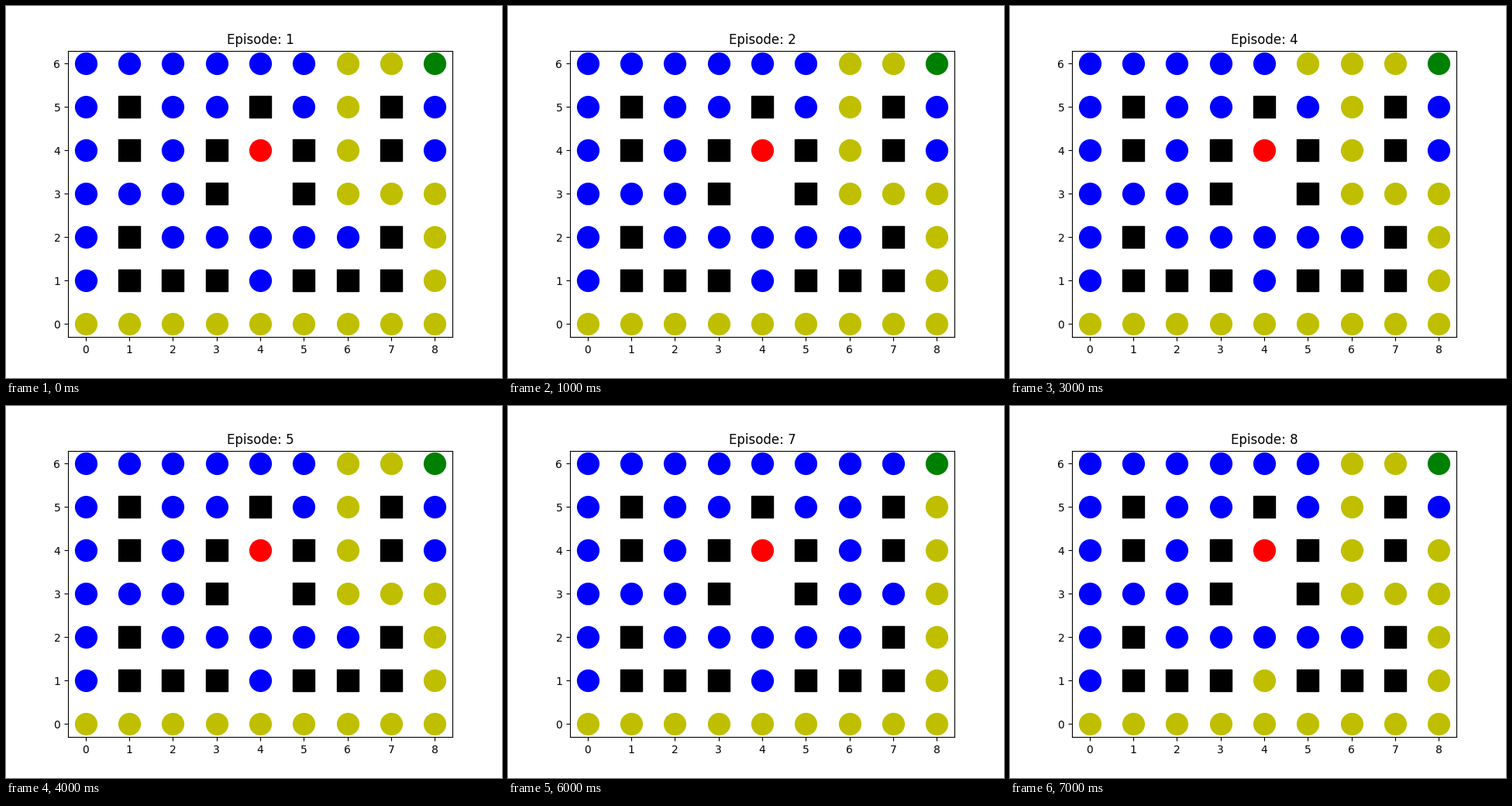
A matplotlib script that plays this animation: 640x480 px, repeating every 8000 ms.

```python
import matplotlib.pyplot as plt
from matplotlib.animation import FuncAnimation

# Maze from the top row down: '#' wall, 'S' start mark, 'G' goal, ' ' left empty
MAZE = [
    "........G",
    ".#..#..#.",
    ".#.#S#.#.",
    "...# #...",
    ".#.....#.",
    ".###.###.",
    ".........",
]
ROWS, COLS = len(MAZE), len(MAZE[0])


def cells(kind):
    return [(x, ROWS - 1 - r) for r, row in enumerate(MAZE)
            for x, c in enumerate(row) if c == kind]


# Visited cells: a shared route, with the side steps some episodes take
BOTTOM = {(x, 0) for x in range(COLS)}
RIGHT = {(8, y) for y in range(1, 6)}
DETOUR = (BOTTOM | {(8, y) for y in range(1, 4)}
          | {(6, y) for y in range(3, 7)} | {(7, 3), (7, 6)})
EXTRA = {4: {(5, 6)}, 6: {(8, 4), (8, 5), (6, 2)}, 8: {(8, 4), (4, 1)}}
EPISODES = 8


def route(episode):
    if episode == 7:
        return BOTTOM | RIGHT
    return DETOUR | EXTRA.get(episode, set())


fig, ax = plt.subplots(figsize=(6.4, 4.8), dpi=100)
ax.set_xlim(-0.4, 8.4)
ax.set_ylim(-0.3, 6.3)
ax.set_xticks(range(COLS))
ax.set_yticks(range(ROWS))
title = ax.set_title("Episode: 1")


def dots(style, points=()):
    line, = ax.plot([], [], style, markersize=20)
    place(line, points)
    return line


def place(line, points):
    line.set_data([p[0] for p in points], [p[1] for p in points])


floor = cells(".")
dots("ks", cells("#"))
dots("ro", cells("S"))
dots("go", cells("G"))
free = dots("bo")
visited = dots("yo")


def update(i):
    steps = route(i + 1)
    place(free, [c for c in floor if c not in steps])
    place(visited, [c for c in floor if c in steps])
    title.set_text(f"Episode: {i + 1}")
    return free, visited, title


anim = FuncAnimation(fig, update, frames=EPISODES, interval=1000,
                     repeat=True, repeat_delay=0, blit=False)
plt.show()
```
